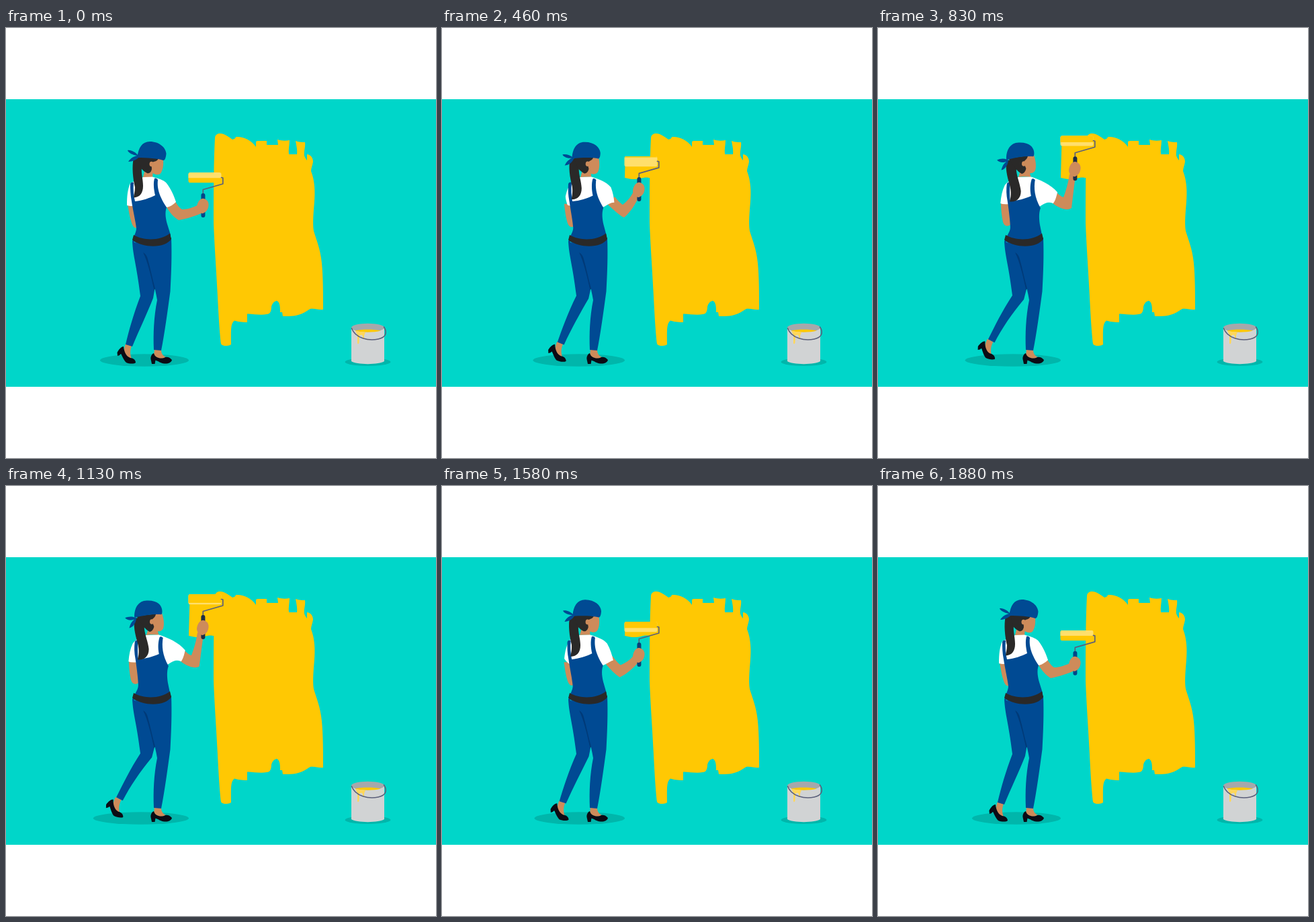
These frames come from a looping animation (640x640 px, 1930 ms). An HTML page with a canvas:

```html
<!DOCTYPE html>
<html lang="en">
<head>
<meta charset="utf-8">
<title>Painting a wall</title>
<style>
html, body { margin: 0; width: 100%; height: 100%; overflow: hidden; background: #fff; }
canvas { display: block; width: 640px; height: 640px; }
</style>
</head>
<body>
<canvas id="stage"></canvas>
<script>
const canvas = document.getElementById('stage');
const ctx = canvas.getContext('2d');
const dpr = window.devicePixelRatio || 1;
canvas.width = canvas.height = 640 * dpr;

const LOOP = 1930, FRAMES = 46, STEP = 1000 / 24;
const TEAL = '#00d6c9', SHADE = '#00b6ab', YELLOW = '#ffc803', LIGHT = '#ffdf6c';
const BLUE = '#004a93', NAVY = '#003a78', DARK = '#2a2928', SKIN = '#ce8b5a';
const BLACK = '#0b0b14', METAL = '#5b5f7a', WHITE = '#fff';

// Path morphing: low pose, high pose, and an optional pose at MID between them
const MID = 0.43;
const NUM = /-?\d+(\.\d+)?/g;
function morph(low, high, mid) {
  const b = high.match(NUM).map(Number);
  const m = mid && mid.match(NUM).map(Number);
  return p => {
    let i = 0;
    return low.replace(NUM, s => {
      const a = +s, k = i++;
      let v = a + (b[k] - a) * p;
      if (m) {
        const bend = m[k] - (a + (b[k] - a) * MID);
        v += bend * p * (1 - p) / (MID * (1 - MID));
      }
      return v.toFixed(3);
    });
  };
}

function fill(d, color) {
  ctx.fillStyle = color;
  ctx.fill(new Path2D(d));
}

function line(d, width) {
  ctx.strokeStyle = METAL;
  ctx.lineWidth = width;
  ctx.lineCap = ctx.lineJoin = 'round';
  ctx.stroke(new Path2D(d));
}

function oval(x, y, rx, ry, color) {
  ctx.fillStyle = color;
  ctx.beginPath();
  ctx.ellipse(x, y, rx, ry, 0, 0, Math.PI * 2);
  ctx.fill();
}

function pill(x, y, w, h, r) {
  ctx.beginPath();
  ctx.roundRect(x, y, w, h, r);
}

const WALL = 'M311 163C312 157 318 156 324 158C329 160 333 163 337 166C340 165 342 164 342 162' +
  'C352 161 366 167 372 177L372 170C372 168 375 168 378 168L388 168L388 174L405 174L404 166' +
  'C410 168 416 168 422 167C422 174 420 181 421 188L433 188C434 182 432 174 431 168' +
  'C436 170 441 170 445 170C446 176 443 184 444 190C445 193 447 196 448 197L448 188' +
  'C453 188 457 193 457 199C456 205 454 209 454 213C460 228 460 245 459 258' +
  'C458 272 456 290 458 302C461 313 468 328 470 350C472 370 472 395 472 419';
const WALL_END = 'C466 420 459 417 453 418C445 422 440 430 412 429L411 423L408 423' +
  'C408 416 408 408 403 406C398 407 396 411 395 415C395 423 392 426 388 426' +
  'C378 428 366 425 359 425.500L359 438C350 438 345 437 340 435.500C334 440 335 450 335 470' +
  'C336 473 322 475 320 470C318 455 316 420 315 400C313 360 310 320 309 290C309 250 309 200 311 163Z';
const TRAIL = 'M274 150L313 150L313 224C306 222 301 222 296 224C288 226 280 225 272 223Z';

const legBack = morph(
  'M188 317C189 340 194 350 200 399C190 425 183 450 178 471L188 474C198 450 210 425 219 402L222 385L212 330Z',
  'M188 317C189 340 194 350 200 398C184 422 174 443 163.5 463L173 468C184 447 199 425 217 404L222 385L212 330Z');

const armBack = morph(
  'M181 263L190 263C192 275 195 283 195.5 297C192 299 189 296 187 290C184 282 183 273 181 263Z',
  'M183 260L194 260C197 272 197 283 197 293C192 296 188 295 186 289C184 280 183 270 183 260Z');

const armFront = morph(
  'M250 255C254 262 258 268 262 270C270 270 278 267 285 264L293 275C283 279 270 284 257 286C250 282 243 274 238 265Z',
  'M266 244C270 248 274 251 276.5 251C280 241 283 230 285 216L294 219C291 240 290 255 289 267C281 273 266 266 259 259Z',
  'M257 251C261 256 266 261 269 263C275 258 281 252 285 243L294 249C288 262 280 275 271 282C264 279 255 270 247 263Z');

const shirt = morph(
  'M204 222L218 221.5C226 224 235 226 239 231C246 240 250 250 253 259C249 263 244 266 239 267L238 266L236 271L222 272L192 266L190 265C187 265 183 265 180 264C180 250 181 240 185 231C190 226 197 223 204 222Z',
  'M208 222L228 221.5C240 225 258 233 268 245C266 252 264 258 261 261L246 255L243 270L222 272L195 266L193 262C189 262 185 262 182 261C183 250 185 241 189 233C194 227 201 224 208 222Z');

const bib = morph(
  'M185 232C186 229 189 229 190 230C189 240 190 250 192 258C203 257 214 253 222 249C220 240 219 231 221 224C223 223 225 224 226 226C225 236 226 247 239 267C236 275 238 285 240 292L245 308L245 320L188 318C190 310 194 304 194 298C193 288 189 272 187 258C185 248 185 240 185 232Z',
  'M192 232C193 229 195 229 197 230C196 240 196 250 197 258C208 257 219 254 228 250C226 240 227 231 229 225C230 224 232 224 234 226C232 238 233 252 242 268C239 276 240 286 241 293L244 308L245 320L188 318C190 311 197 304 197 297C197 288 195 272 193 258C191 248 191 240 192 232Z');

const neck = morph(
  'M206 214L219 213L218 222C214 222 208 222 204 222Z',
  'M212 213L225 212L228 222C222 221 214 221 209 222Z');

const face = morph(
  'M214 194L234 195C234.5 203 234 209 231 215C229 219 225 219 220 217L214 212Z',
  'M214 192L232 189C235 198 236 206 234 212C231 217 226 217 220 215L215 211Z');

const hair = morph(
  'M197 191L227 194C225 199 221 198 218 200C216 204 217 207 217 210C216 215 213 217 210 216C206 214 204 212 201 209Z',
  'M194 194L223 190C222 195 220 196 218 198C217 202 219 205 220.5 209C220 213 217 217 214 217C210 215 207 212 204 208Z');

const ponytail = morph(
  'M190 193C187 206 189 225 192 237C192 244 190 249 190 252.5C199 252 204 246 204 235C204 225 201 216 202 208L205 193Z',
  'M192 197C189 206 192 220 196 233C199 244 198 253 196 258.5C206 260 213 254 213 243C212 233 207 222 206 212L207 195Z');

const cap = morph(
  'M195.5 192C197 178 203 169 214 169C228 169 238 178 238.5 187C238 192 237 197 234 197C226 194 210 193 196 193Z',
  'M191 196C190 182 197 170 210 170.5C225 170 231 177 232 184C232.5 188 232 190 231 191C222 190 206 192 192 196Z');

const knot = morph(
  'M197 190C193 185 186 181 181 182C182 186 189 189 195 190C190 191 185 194 182 199C188 199 195 196 198 192Z',
  'M192 196C187 194 181 195 177 197C180 201 187 201 191 199C187 202 185 206 183.5 212C189 211 193 205 194 197Z');

// Rolls over by two full turns per loop; each unit is half a turn
const TURN = [[0, 0.53], [11, 1.1], [20, 1.63], [27, 1.83], [33, 3], [38, 3.6], [45, 4.52], [46, 4.53]];

function turnAt(f) {
  const i = TURN.findIndex(k => k[0] > f);
  const [a, u] = TURN[i - 1], [b, v] = TURN[i];
  return u + (v - u) * (f - a) / (b - a);
}

function ease(u) {
  u = Math.min(1, Math.max(0, u));
  return u < 0.5 ? 0.5 * (2 * u) ** 2.2 : 1 - 0.5 * (2 - 2 * u) ** 2.2;
}

function liftAt(f) {
  const top = 23.2;
  return f < top ? ease((f - 0.4) / (top - 0.4)) : 1 - ease((f - top) / (46 - top));
}

function drawBucket() {
  oval(538.5, 497, 34, 6, SHADE);
  fill('M514 446L563 446L563 496C556 501.5 521 501.5 514 496Z', '#d1d3d4');
  oval(538.5, 446, 24.5, 6.3, '#a6a8ab');
  fill('M519 450.500C530 448 547 448 558 450.500C548 453.500 529 453.500 519 450.500Z', YELLOW);
  fill('M520 451L535 453C534 456 533 456 533 460C533 463 531 463 531 460C531 456 527 456 526 459' +
    'L525.500 468C525 471 523 471 523 468L523 457Z', '#ffd75a');
  line('M514.500 447C520 462 540 466 554 463C567 460 567 452 562.500 445', 1.6);
}

function drawShoes(p) {
  ctx.save();
  ctx.translate(181 - 16 * p, 473 - 7 * p);
  ctx.rotate(8 * p * Math.PI / 180);
  ctx.translate(-181, -473);
  fill('M178 470L187 473C184 481 185 487 187 492L179 490C175 483 175 478 178 470Z', SKIN);
  fill('M175 474C172 474 168 478 165.500 483L166 488L169 487L171 485C173 488 175 494 179 498' +
    'C184 500 191 500 193 498C193 494 189 491 185 491C180 489 176 484 175 474Z', BLACK);
  ctx.restore();
  fill('M221 478L231 479C231 485 234 488 238 490L230 493L220 488Z', SKIN);
  fill('M220 484C217 485 215 489 215.500 493L217 500L221.500 500L222.500 494.500C227 496 230 499 236 499.500' +
    'C241 500 246 498 247 494C244 490 240 489 237 490C232 493 222 492 220 484Z', BLACK);
}

function drawRoller(y, turn, p) {
  const h = 15.5;
  ctx.save();
  pill(271.5, y, 49, h, 3);
  ctx.clip();
  const half = Math.floor(turn) % 2, edge = (turn % 1) * h;
  ctx.fillStyle = half ? LIGHT : YELLOW;
  ctx.fillRect(270, y, 52, h);
  ctx.fillStyle = half ? YELLOW : LIGHT;
  ctx.fillRect(270, y, 52, edge);
  ctx.restore();

  ctx.save();
  ctx.translate(0, y);
  line('M320.500 7.500L322.800 8L322.800 17L293.300 25.500L293.300 34', 1.7);
  const c = (a, b) => Math.round(a + (b - a) * p);
  ctx.fillStyle = `rgb(${c(0, 30)},${c(70, 44)},${c(136, 66)})`;
  pill(290.4, 31, 6, 36, 3);
  ctx.fill();
  ctx.restore();
}

function drawWoman(p, y, turn) {
  const left = 140 - 10.7 * p;
  oval((left + 272) / 2, 494.5, (272 - left) / 2, 9.3, SHADE);
  drawShoes(p);
  fill(armBack(p), SKIN);
  fill(legBack(p), BLUE);
  fill('M246 312C247 340 246 365 244.500 392C240 425 236 455 231 480L220 479C219 455 220 430 225 405' +
    'C222 385 214 360 206 335L190 316Z', BLUE);
  fill('M204 334C208 336 210 340 211 344C215 358 218 374 222 388L220.500 390C216 370 211 348 204 334Z', NAVY);
  fill(armFront(p), SKIN);
  fill(neck(p), SKIN);
  fill(shirt(p), WHITE);
  fill(bib(p), BLUE);
  fill('M190 308C205 317 230 317 244 305.500L246 314C238 327 207 329 188 315.500Z', DARK);

  fill(face(p), SKIN);
  fill(ponytail(p), DARK);
  fill(hair(p), DARK);
  oval(216.5 + 0.5 * p, 202.5 - 0.5 * p, 3, 3.8, SKIN);
  fill(knot(p), BLUE);
  fill(cap(p), BLUE);

  drawRoller(y, turn, p);
  ctx.save();
  ctx.translate(0, y - 215);
  fill('M284 266C285 259 288 255 292 254C296 253 301 257 301.500 262C302 269 298 274 293 276C288 276 284 272 284 266Z', SKIN);
  ctx.restore();
}

function draw(f) {
  const p = liftAt(f), y = 215 - 56.5 * p;
  ctx.setTransform(dpr, 0, 0, dpr, 0, 0);
  ctx.fillStyle = WHITE;
  ctx.fillRect(0, 0, 640, 640);
  ctx.fillStyle = TEAL;
  ctx.fillRect(0, 106, 640, 428);
  fill(WALL + WALL_END, YELLOW);

  ctx.save();
  ctx.beginPath();
  ctx.rect(260, y + 8, 60, 100);
  ctx.clip();
  fill(TRAIL, YELLOW);
  ctx.restore();

  drawBucket();
  drawWoman(p, y, turnAt(f));
}

const start = performance.now();
function tick() {
  const t = (performance.now() - start) % LOOP;
  draw(Math.min(FRAMES - 1, Math.floor((t + 5) / STEP)));
  requestAnimationFrame(tick);
}
tick();
</script>
</body>
</html>
```
